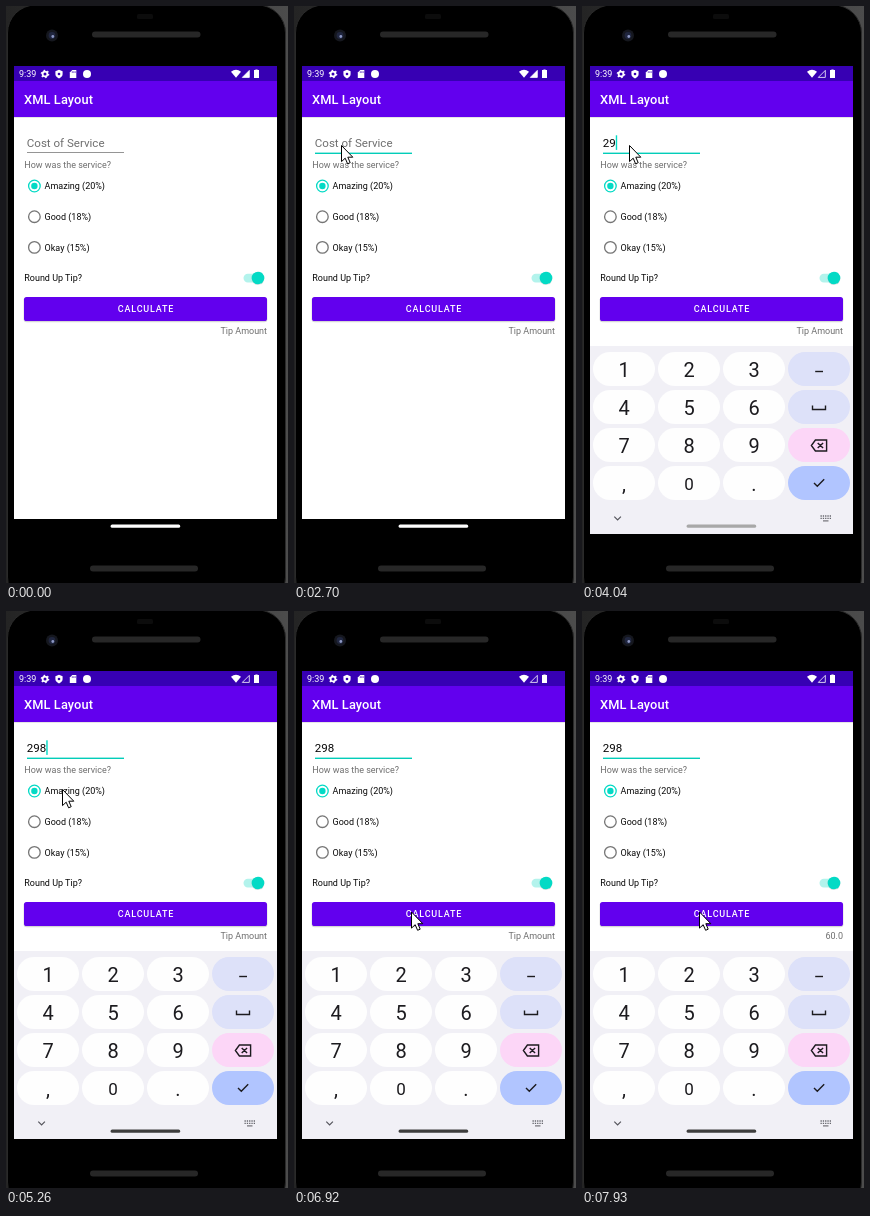
Write an HTML page that moves like this. It is 282 px wide and 577 px high and loops after 8000 ms.

```html
<!DOCTYPE html>
<html lang="en">
<head>
<meta charset="utf-8">
<title>Tip calculator</title>
<style>
html, body { margin: 0; width: 100%; height: 100%; overflow: hidden; background: #000; }
svg { display: block; width: 100vw; height: 100vh; }
text { font-family: Roboto, sans-serif; font-size: 8.99px; fill: #080808; white-space: pre; }
.hint { fill: #6e6e6e; }
.field { font-size: 11.55px; }
.title { font-size: 12.84px; font-weight: 500; letter-spacing: .0075em; fill: #fff; }
.button { font-weight: 500; letter-spacing: .0892em; fill: #fff; }
.key { font-size: 20px; text-anchor: middle; fill: #1c1b1f; }
.icon { fill: none; stroke: #1c1b1f; stroke-width: 1.4; }
</style>
</head>
<body>
<svg viewBox="0 0 282 577">
  <defs>
    <clipPath id="screenClip"><rect x="8" y="60" width="263" height="468"/></clipPath>
    <clipPath id="buttonClip"><rect x="18" y="291" width="243" height="24" rx="2.6"/></clipPath>
    <linearGradient id="edge">
      <stop offset="0" stop-color="#242424"/>
      <stop offset="1" stop-color="#4c4c4c"/>
    </linearGradient>
  </defs>

  <rect width="282" height="577" fill="url(#edge)"/>
  <rect x="1.5" y="-1" width="278" height="600" rx="28" fill="#000" stroke="#2a2a2a"/>
  <rect x="131" y="8" width="16" height="5" rx="1.5" fill="#0c0c0c"/>
  <rect x="86" y="25.5" width="108.5" height="6" rx="3" fill="#272727"/>
  <rect x="84" y="559.5" width="108" height="6" rx="3" fill="#272727"/>
  <circle cx="46" cy="29.5" r="6" fill="#15171e"/>
  <circle cx="46" cy="29.5" r="3.4" fill="#20263f"/>
  <circle cx="46.8" cy="30.5" r="1.4" fill="#8d98c4"/>

  <g clip-path="url(#screenClip)">
    <rect x="8" y="60" width="263" height="468" fill="#000"/>
    <rect x="8" y="110" width="263" height="403" fill="#fff"/>
    <rect x="8" y="111" width="263" height="1" fill="#000" opacity=".1"/>
    <rect x="8" y="60" width="263" height="15.5" fill="#3700b3"/>
    <rect x="8" y="75" width="263" height="36" fill="#6200ee"/>

    <text x="13" y="71.2" style="fill:#fff">9:39</text>
    <g fill="#fff">
      <circle cx="39" cy="68" r="2.4" fill="none" stroke="#fff" stroke-width="1.8"/>
      <circle cx="39" cy="68" r="3.7" fill="none" stroke="#fff" stroke-width="1.2" stroke-dasharray="1.6 2.275"/>
      <path d="M53 63.7L56.6 65.2V68Q56.6 71 53 72.4Q49.4 71 49.4 68V65.2Z"/>
      <circle cx="53" cy="68" r="1.3" fill="#3700b3"/>
      <path d="M66.3 64H70.3V72H63.8V66.5Z"/>
      <path d="M66.3 65.2V67M67.8 65.2V67M69.2 65.2V67" stroke="#3700b3" stroke-width=".6"/>
      <circle cx="81" cy="68" r="4"/>
      <path d="M225 65.8Q230 61.8 235 65.8L230 71.8Z"/>
      <path id="signal" d="M243.3 64.4V71.4H236.3Z" stroke="#fff" stroke-width=".8"/>
      <path d="M249.4 64V63.4H251.6V64H253V72H248V64Z"/>
    </g>
    <text class="title" x="18" y="98">XML Layout</text>

    <text class="field hint" id="cost" x="20.8" y="141"></text>
    <rect id="line" x="21" width="97"/>
    <rect id="caret" y="129.3" width="1.4" height="14.6" fill="#03dac5"/>
    <text class="hint" x="18.3" y="162">How was the service?</text>
    <g id="radios"></g>

    <text x="18.3" y="275.2">Round Up Tip?</text>
    <rect x="237.5" y="267.8" width="20" height="8.6" rx="4.3" fill="#b3f3ec"/>
    <circle cx="252" cy="272.6" r="6.4" fill="#000" opacity=".12"/>
    <circle cx="252" cy="272" r="6.3" fill="#03dac5"/>

    <rect x="17.6" y="291.4" width="243.8" height="24.8" rx="3" fill="#000" opacity=".16"/>
    <rect x="18" y="291" width="243" height="24" rx="2.6" fill="#6200ee"/>
    <circle id="ripple" cx="118" cy="301" fill="#fff" clip-path="url(#buttonClip)"/>
    <text class="button" x="111.8" y="306.2">CALCULATE</text>
    <text class="hint" id="tip" x="261" y="328" text-anchor="end"></text>

    <g id="keyboard">
      <rect x="8" y="340" width="263" height="240" fill="#f1f0f6"/>
      <g id="keys"></g>
      <g class="icon">
        <path d="M233.2 365.5H241"/>
        <path d="M230.5 399.5V403.5H243.5V399.5"/>
        <path d="M233.4 434H244.6V445H233.4L229.4 439.5ZM235.7 436.9L241.1 442.1M241.1 436.9L235.7 442.1"/>
        <path d="M232 477L235.3 480.3L242.2 473.2"/>
        <path d="M32.3 510.6L35.6 513.9L38.9 510.6" stroke="#55555c" stroke-width="1.2"/>
        <path d="M238.5 510H249M238.5 512.4H249" stroke="#66666d" stroke-dasharray="1.3 1"/>
        <path d="M241 514.9H246.5" stroke="#66666d" stroke-width="1.1"/>
      </g>
    </g>
    <rect id="pill" x="104.6" y="518.5" width="69.6" height="3.3" rx="1.6"/>
  </g>

  <path id="pointer" d="M0 .5V16.6L3.7 13.2L6.1 18.8L8.7 17.7L6.3 12.2H11.3Z" fill="#fff" stroke="#000" stroke-width="1"/>
</svg>
<script>
const LOOP = 8000;
const $ = id => document.getElementById(id);
const set = (el, attrs) => { for (const k in attrs) el.setAttribute(k, attrs[k]); };

function add(parent, tag, attrs, label = '') {
  const el = document.createElementNS('http://www.w3.org/2000/svg', tag);
  set(el, attrs);
  el.textContent = label;
  parent.append(el);
}

['Amazing (20%)', 'Good (18%)', 'Okay (15%)'].forEach((label, i) => {
  const y = 180 + i * 30.7, color = i ? '#757575' : '#03dac5';
  add($('radios'), 'circle', { cx: 28.4, cy: y, r: 5.8, fill: 'none', stroke: color, 'stroke-width': 1.3 });
  if (!i) add($('radios'), 'circle', { cx: 28.4, cy: y, r: 3.2, fill: color });
  add($('radios'), 'text', { x: 38.6, y: y + 3.1 }, label);
});

const sideKeys = ['#dde1f9', '#dde1f9', '#fcd6f7', '#b1c5ff'];
['123', '456', '789', ',0.'].forEach((row, r) => {
  const y = 346 + r * 38;
  for (let c = 0; c < 4; c++) {
    const x = 11 + c * 65;
    add($('keys'), 'rect', { x, y, width: 62, height: 34, rx: 17, fill: c < 3 ? '#fefefe' : sideKeys[r] });
    if (c < 3) {
      const zero = row[c] === '0';
      add($('keys'), 'text', { class: 'key', x: x + 31, y: y + (zero ? 24 : 25.3), style: zero ? 'font-size:17px' : '' }, row[c]);
    }
  }
});

// Pointer samples: time, x, y
const path = [
  [400, 137, 239], [520, 116, 228], [780, 95, 204], [900, 72, 172], [1020, 56, 150],
  [1160, 53, 146], [1290, 50, 142], [1420, 47.5, 139], [5260, 56.5, 178], [5380, 70, 215],
  [5630, 54, 204], [5750, 35, 189], [5870, 23, 179], [6260, 41, 204], [6380, 65, 235],
  [6500, 88, 262], [6620, 103, 278], [6770, 112, 294], [6920, 117.5, 300.5]
];
const typed = [[3680, '2'], [3920, '29'], [4280, '298']];
const blinks = [2980, 3410, 3680, 4760, 5260, 5750, 6260, 6770, 7440, 7810];
const last = (list, t) => list.filter(k => k[0] <= t).pop();
const clamp = v => Math.max(0, Math.min(1, v));
const mix = (a, b, p) => Math.round(a + (b - a) * p);

function draw(t) {
  const at = last(path, t);
  set($('pointer'), at
    ? { visibility: 'visible', transform: `translate(${at[1]} ${at[2]})` }
    : { visibility: 'hidden' });

  const entry = last(typed, t), value = entry ? entry[1] : '';
  $('cost').textContent = value || 'Cost of Service';
  $('cost').style.fill = value ? '#080808' : '';
  const focused = t >= 2450;
  set($('line'), { y: focused ? 146.6 : 146, height: focused ? 1.4 : .9, fill: focused ? '#03cdb9' : '#8a8a8a' });
  const caretOn = blinks.filter(b => b <= t).length % 2;
  set($('caret'), { x: 20.8 + value.length * 6.49, visibility: caretOn ? 'visible' : 'hidden' });

  set($('keyboard'), {
    visibility: t >= 2980 ? 'visible' : 'hidden',
    transform: `translate(0 ${t < 3100 ? 24 : 0})`
  });
  set($('signal'), { fill: t < 3410 ? '#fff' : 'none' });
  const shade = mix(255, 62, clamp((t - 3410) / 1400));
  set($('pill'), { fill: `rgb(${shade},${shade},${shade})` });

  const press = t - 7440;
  set($('ripple'), {
    r: press < 0 ? 0 : 60 + 100 * clamp(press / 200),
    opacity: press < 0 ? 0 : .22 * (1 - clamp((press - 120) / 300))
  });
  $('tip').textContent = t < 7560 ? 'Tip Amount' : '60.0';
}

const start = performance.now();
function tick() {
  draw((performance.now() - start) % LOOP);
  requestAnimationFrame(tick);
}
tick();
</script>
</body>
</html>
```
